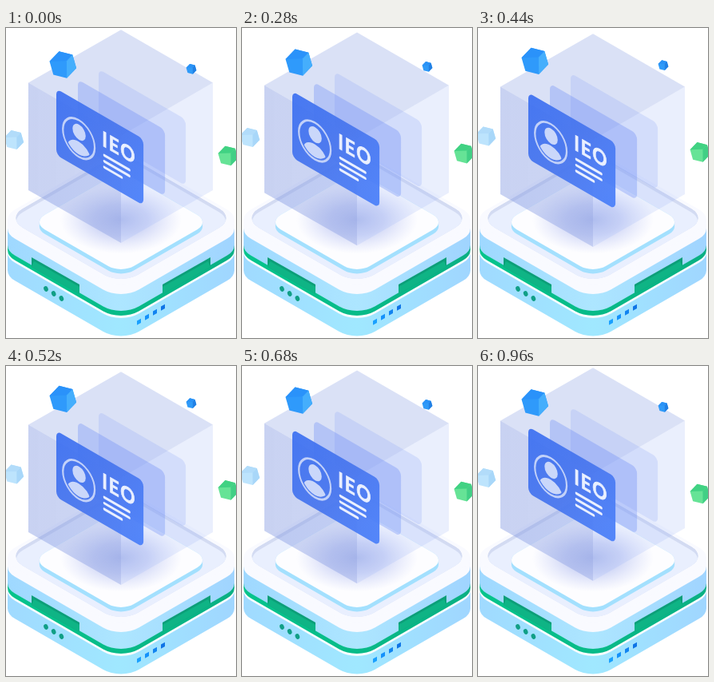
An HTML page with a canvas for the animation above (1000 ms loop, 288 px wide and 388 px high).

```html
<!DOCTYPE html>
<html>
<head>
<meta charset="utf-8">
<style>
html, body { margin: 0; width: 100%; height: 100%; overflow: hidden; background: #fff; }
canvas { display: block; width: 288px; height: 388px; }
</style>
</head>
<body>
<canvas id="stage"></canvas>
<script>
const W = 288, H = 388, LOOP = 1000, STEP = 40;
const canvas = document.getElementById('stage');
const ctx = canvas.getContext('2d');
const dpr = window.devicePixelRatio || 1;
canvas.width = W * dpr;
canvas.height = H * dpr;
ctx.scale(dpr, dpr);

const CX = 144, SLOPE = 0.577, ROUND = 0.203;

function poly(points, fill) {
  ctx.beginPath();
  points.forEach(([x, y]) => ctx.lineTo(x, y));
  ctx.closePath();
  ctx.fillStyle = fill;
  ctx.fill();
}

function linear(x0, y0, x1, y1, ...colors) {
  const g = ctx.createLinearGradient(x0, y0, x1, y1);
  colors.forEach((c, i) => g.addColorStop(i / (colors.length - 1), c));
  return g;
}

// Rounded square lying flat; half is its sharp half width.
function tile(cy, half) {
  const side = half * Math.SQRT2;
  const m = new DOMMatrix().translate(CX, cy).scale(1, SLOPE).rotate(45);
  const square = new Path2D();
  square.roundRect(-side / 2, -side / 2, side, side, half * ROUND);
  const path = new Path2D();
  path.addPath(square, m);
  return path;
}

function slab(cy, half, depth, fill) {
  const reach = half * (1 - ROUND * (Math.SQRT2 - 1));
  ctx.fillStyle = fill;
  ctx.fill(tile(cy + depth, half));
  ctx.fillRect(CX - reach, cy, reach * 2, depth);
  ctx.fill(tile(cy, half));
}

function slot(right) {
  ctx.save();
  if (right) {
    ctx.translate(W, 0);
    ctx.scale(-1, 1);
  }
  poly([[32, 287], [92, 321], [92, 333], [32, 299]], '#0c9f78');
  poly([[35, 292], [92, 324], [92, 333], [32, 299]], '#0fb485');
  ctx.restore();
}

function base() {
  const half = 155, y = 240;
  slab(y + 41, half, 22.5, linear(2, 0, 286, 0, '#a0daff', '#a0e8ff', '#a0d6ff'));
  slab(y + 38, half, 3, '#fbfdff');
  slab(y + 32, half, 6, linear(2, 0, 286, 0, '#06c48c', '#08bb88', '#0ab083'));
  slab(y + 11, half, 21, linear(2, 0, 286, 0, '#9fd8ff', '#ade6ff', '#a0d4ff'));
  slab(y, half, 11, '#f9faff');
  slot(false);
  slot(true);

  const well = tile(238, 144);
  ctx.save();
  ctx.clip(well);
  ctx.fillStyle = '#d3dbf2';
  ctx.fill(well);
  ctx.fillStyle = '#e9effe';
  ctx.fill(tile(242, 143));
  ctx.restore();

  slab(243, 111.5, 5.5, '#a3e0fe');
  ctx.fillStyle = '#fdfdff';
  ctx.fill(tile(243, 111.5));

  ctx.fillStyle = '#109f86';
  for (let i = 0; i < 3; i++) {
    ctx.beginPath();
    ctx.ellipse(50 + i * 9.7, 326.5 + i * 6, 2.7, 3.4, -0.4, 0, Math.PI * 2);
    ctx.fill();
  }
  ['#1aa0ff', '#1592fb', '#1284f0', '#0f74e6'].forEach((c, i) => {
    const x = 164 + i * 10, y = 366.5 - i * 6;
    poly([[x, y], [x + 5, y - 2.7], [x + 5, y + 2.6], [x, y + 5.3]], c);
  });
}

function glow() {
  ctx.save();
  ctx.translate(CX, 240);
  ctx.scale(1, 0.56);
  const g = ctx.createRadialGradient(0, 0, 0, 0, 0, 76);
  g.addColorStop(0, 'rgba(105,128,218,.48)');
  g.addColorStop(0.45, 'rgba(120,140,228,.33)');
  g.addColorStop(1, 'rgba(150,165,240,0)');
  ctx.fillStyle = g;
  ctx.fillRect(-80, -80, 160, 160);
  ctx.restore();
}

function card(x, y, fill, content) {
  ctx.save();
  ctx.transform(0.866, 0.5, 0, 1, x, y);
  ctx.beginPath();
  ctx.roundRect(0, 0, 126, 83, 7);
  ctx.fillStyle = fill;
  ctx.fill();
  if (content) content();
  ctx.restore();
}

function disc(x, y, rx, ry = rx) {
  ctx.beginPath();
  ctx.ellipse(x, y, rx, ry, 0, 0, Math.PI * 2);
}

function badge() {
  ctx.strokeStyle = '#c2d1f9';
  ctx.lineWidth = 2.6;
  disc(32.5, 46, 23);
  ctx.stroke();
  ctx.fillStyle = '#cad7fa';
  disc(33, 38, 9.5);
  ctx.fill();
  ctx.save();
  disc(32.5, 46, 20);
  ctx.clip();
  disc(32.5, 63, 16.5, 13);
  ctx.fill();
  ctx.restore();

  ctx.fillStyle = ctx.strokeStyle = '#eaf0ff';
  ctx.font = 'bold 26px Lato, "Open Sans", sans-serif';
  ctx.letterSpacing = '2.2px';
  ctx.fillText('IEO', 66, 38);
  ctx.lineWidth = 0.8;
  ctx.strokeText('IEO', 66, 38);
  ctx.lineWidth = 3.4;
  ctx.lineCap = 'round';
  [36, 36, 25].forEach((len, i) => {
    const y = 48.8 + i * 7.4;
    ctx.beginPath();
    ctx.moveTo(69.5, y);
    ctx.lineTo(69.5 + len, y);
    ctx.stroke();
  });
}

function glassCube(dy) {
  ctx.save();
  ctx.translate(0, dy);
  const mid = [144, 135], left = [28, 68.5], right = [259, 68.5], foot = [144, 269];
  poly([[144, 2.3], right, mid, left], 'rgba(150,170,230,.35)');
  poly([mid, right, [259, 203], foot], 'rgba(150,175,245,.2)');
  poly([left, mid, foot, [28, 203]], linear(28, 0, 144, 0, 'rgba(130,152,225,.44)', 'rgba(140,160,228,.42)'));
  card(116, 51.5, 'rgba(120,150,245,.2)');
  card(90, 64.5, 'rgba(100,135,245,.32)');
  card(63, 76, linear(0, 0, 126, 83, 'rgba(60,112,241,.93)', 'rgba(72,118,238,.93)', 'rgba(74,128,250,.93)'), badge);
  ctx.restore();
}

// Small cube seen from the front left, its near corner up and to the right.
function chip(x, y, r, top, front, side) {
  const at = i => {
    const a = -0.28 + i * Math.PI / 3 - Math.PI / 2;
    return [x + r * Math.cos(a), y + r * Math.sin(a)];
  };
  const mid = [x + r * 0.27, y - r * 0.28];
  poly([0, 1, 2, 3, 4, 5].map(at), front);
  poly([at(0), at(1), mid, at(5)], top);
  poly([at(1), at(2), at(3), mid], side);
}

function draw(now) {
  const t = Math.floor((now % LOOP) / STEP) * STEP;
  const k = 1 - Math.abs(t - 480) / 480;
  ctx.clearRect(0, 0, W, H);
  base();
  glow();
  glassCube(5.4 * k);
  const up = -5 * k;
  chip(71.3, 46 + up, 17.3, '#2a92fa', '#2f9afb', '#45aefc');
  chip(232, 51.3 + up, 6.6, '#2a92f6', '#2f9af8', '#2280e4');
  chip(10, 140 + up, 12.5, '#b2dcfa', '#bde4fd', '#a8d7f9');
  chip(278, 160 + up, 12.8, '#41d283', '#66e396', '#42cf85');
}

const start = performance.now();
function tick() {
  draw(performance.now() - start);
  requestAnimationFrame(tick);
}
tick();
</script>
</body>
</html>
```
